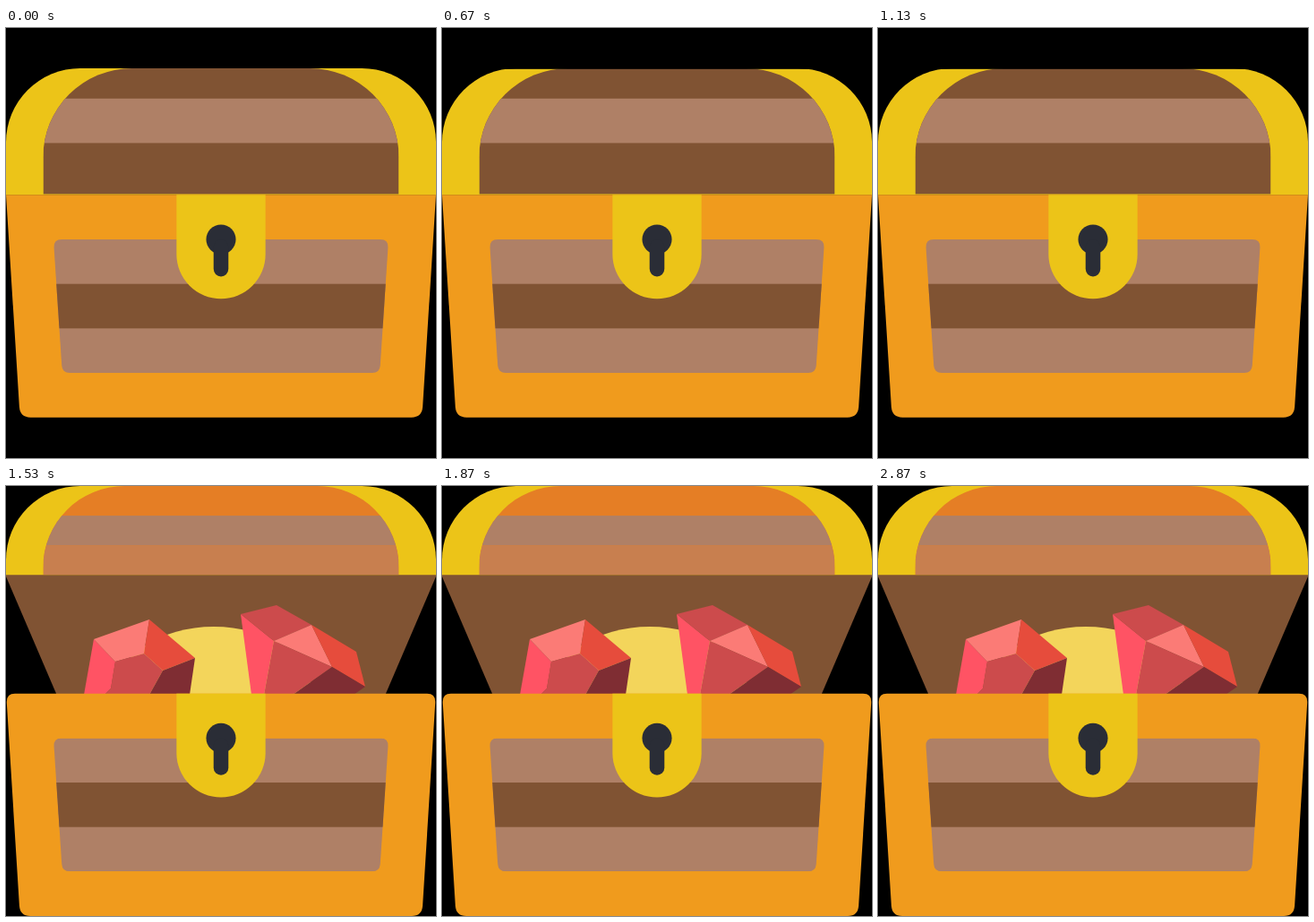
These frames come from a looping animation (480x480 px, 3070 ms). An HTML page:

```html
<!DOCTYPE html>
<html lang="en">
<head>
<meta charset="utf-8">
<title>Treasure chest</title>
<style>
  html, body { margin: 0; width: 100%; height: 100%; overflow: hidden; background: #000; }
  svg { display: block; width: 100vw; height: 100vh; }
  #open { visibility: hidden; }
  .gold { fill: #ecc418; }
  .orange { fill: #f09b1d; }
  .wood { fill: #805333; }
  .plank { fill: #af8066; }
  .ink { fill: #2a2d36; }
  .rose { fill: #ff5364; }
  .blush { fill: #fb7b76; }
  .red { fill: #e64c3c; }
  .ruby { fill: #cc4b4c; }
  .wine { fill: #7f2d33; }
</style>
</head>
<body>
<svg viewBox="0 0 480 480">
  <defs>
    <clipPath id="domeClosed"><path d="M5 17V12A12 12 0 0 1 17 0H41A12 12 0 0 1 53 12V17Z"/></clipPath>
    <clipPath id="domeOpen"><path d="M5 12V11A11 11 0 0 1 16 0H42A11 11 0 0 1 53 11V12Z"/></clipPath>
    <clipPath id="panel"><path d="M7.5 6H50.5Q51.6 6 51.53 7.1L50.48 23Q50.4 24 49.4 24H8.6Q7.6 24 7.52 23L6.47 7.1Q6.4 6 7.5 6Z"/></clipPath>
    <g id="front">
      <g clip-path="url(#panel)">
        <rect class="plank" x="6" y="6" width="46" height="18"/>
        <rect class="wood" x="6" y="12" width="46" height="6"/>
      </g>
      <path class="gold" d="M23 0H35V8A6 6 0 0 1 23 8Z"/>
      <circle class="ink" cx="29" cy="6" r="2"/>
      <rect class="ink" x="28" y="6" width="2" height="5" rx="1"/>
    </g>
  </defs>
  <rect width="480" height="480"/>

  <!-- 58 units across the stage -->
  <g id="closed" transform="translate(0 45) scale(8.2759)">
    <path class="gold" d="M0 17.1V10A10 10 0 0 1 10 0H48A10 10 0 0 1 58 10V17.1Z"/>
    <g clip-path="url(#domeClosed)">
      <rect class="wood" x="5" width="48" height="17"/>
      <rect class="plank" x="5" y="4.08" width="48" height="6"/>
    </g>
    <g transform="translate(0 17.08)">
      <path class="orange" d="M0 0H58L56.2 28.6Q56.1 30 54.7 30H3.3Q1.9 30 1.8 28.6Z"/>
      <use href="#front"/>
    </g>
    <rect id="trim" y="-.2" width="58" height=".3" visibility="hidden"/>
  </g>

  <g id="open">
    <path class="wood" d="M0 99H480V101L423 234H57L0 101Z"/>
    <ellipse cx="232" cy="232" rx="110" ry="75" fill="#f3d55b"/>
    <g id="gems"></g>
    <g transform="scale(8.2759)">
      <path class="gold" d="M0 12V10A10 10 0 0 1 10 0H48A10 10 0 0 1 58 10V12Z"/>
      <g clip-path="url(#domeOpen)">
        <rect x="5" width="48" height="12" fill="#e57e25"/>
        <rect class="plank" x="5" y="4" width="48" height="4"/>
        <rect x="5" y="8" width="48" height="4" fill="#c87f4f"/>
      </g>
      <g transform="translate(0 28)">
        <path class="orange" d="M1.2 0H56.8Q57.95 0 57.9 1.2L56.2 28.6Q56.1 30 54.7 30H3.3Q1.9 30 1.8 28.6L.1 1.2Q.05 0 1.2 0Z"/>
        <use href="#front"/>
      </g>
    </g>
  </g>
</svg>
<script>
  const LOOP = 3070, SETTLE = 70, OPEN = 1530;
  const $ = id => document.getElementById(id);

  const facets = [
    ['rose', '98,171 122,196 117,226 110,233 87,233'],
    ['blush', '98,171 160,149 154,187 122,196'],
    ['red', '160,149 211,192 175,206 154,187'],
    ['ruby', '122,196 154,187 175,206 160,233 110,233 117,226'],
    ['wine', '211,192 205,233 160,233 175,206'],
    ['rose', '262,143 299,173 288,233 274,233'],
    ['ruby', '262,143 302,133 341,155 299,173'],
    ['blush', '299,173 341,155 364,202'],
    ['red', '341,155 391,185 401,224 364,202'],
    ['ruby', '299,173 364,202 320,233 288,233'],
    ['wine', '364,202 401,224 388,233 320,233']
  ];
  $('gems').innerHTML = facets
    .map(([tone, points]) => `<polygon class="${tone}" points="${points}"/>`).join('');

  const show = (id, on) => { $(id).style.visibility = on ? 'visible' : 'hidden'; };
  const start = performance.now();

  function draw(now) {
    const t = Math.max(0, now - start) % LOOP;
    show('closed', t < OPEN);
    show('trim', t >= SETTLE && t < OPEN);
    show('open', t >= OPEN);
    requestAnimationFrame(draw);
  }
  draw(start);
</script>
</body>
</html>
```
